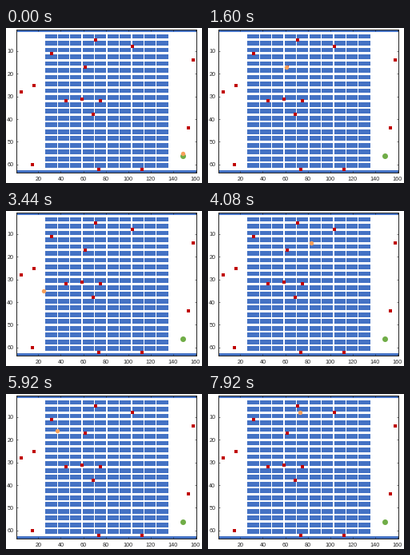
Recreate the animation shown at these times as a matplotlib script. Size 245x194 px, loop 8 s.

```python
import matplotlib.pyplot as plt
from matplotlib.animation import FuncAnimation
from matplotlib.patches import Rectangle

W, H, DPI = 245, 194, 72
COLS, ROWS = 160, 63
LEFT, RIGHT, TOP, BOTTOM = 12.98, 237.62, 2.03, 180.8
FRAMES, INTERVAL, CELLS_PER_FRAME = 100, 80, 10

plt.rcParams["font.family"] = "Liberation Sans"
BLUE, RED, GREEN, ORANGE = "#4472c4", "#c00000", "#70ad47", "#f8a05a"

STATION = (149, 56)
ORDERS = dict(A=(71, 5), B=(104, 8), C=(32, 11), D=(158, 14), E=(62, 17),
              F=(16, 25), G=(5, 28), H=(59, 31), I=(45, 32), J=(75, 32),
              K=(69, 38), L=(154, 44), M=(15, 60), N=(74, 62), O=(112, 62))
TOUR = "HICEJONMIDJCEJKHGFB"
SLOW_PICKS = "GHI"  # these cost one extra step

AISLES = [25, *range(37, 126, 11)]
SHELF_END, SIDE_LANE = 135, 156


def corners(start, goal):
    """Drive along the row aisle, cross at the leftmost aisle on the way."""
    (x, y), (gx, gy) = start, goal
    route = []
    if x > SHELF_END:  # open floor: line up with the goal's aisle first
        x = min(x, SIDE_LANE)
        route.append((x, y))
        y = gy + (2 - gy) % 3
    while y % 3 != 2:
        y += 1 if gy > y else -1
    cross = next((a for a in AISLES if min(x, gx) <= a <= max(x, gx)), gx)
    return route + [(x, y), (cross, y), (cross, gy), goal]


def straight(start, end):
    (x0, y0), (x1, y1) = start, end
    n = max(abs(x1 - x0), abs(y1 - y0))
    return [(x0 + (x1 - x0) * k // n, y0 + (y1 - y0) * k // n)
            for k in range(1, n + 1)]


def drive(start, tour):
    """One grid cell per step for the whole tour."""
    cells = [start]
    for name in tour:
        for corner in corners(cells[-1], ORDERS[name]):
            cells += straight(cells[-1], corner)
        if name in SLOW_PICKS:
            cells.append(cells[-1])
    return cells


cells = drive((STATION[0], STATION[1] - 1), TOUR)

fig = plt.figure(figsize=(W / DPI, H / DPI), dpi=DPI, facecolor="white")
ax = fig.add_axes([LEFT / W, 1 - BOTTOM / H, (RIGHT - LEFT) / W, (BOTTOM - TOP) / H])
ax.set_xlim(0.5, COLS + 0.5)
ax.set_ylim(ROWS + 0.5, 0.5)
ax.set_xticks(range(20, 161, 20))
ax.set_yticks(range(10, 61, 10))
ax.tick_params(direction="in", top=True, right=True, length=2, width=0.6,
               labelsize=7.3, color="#262626", labelcolor="#262626")
ax.tick_params(axis="x", pad=5.5)
ax.tick_params(axis="y", pad=3.5)
for spine in ax.spines.values():
    spine.set(color="#262626", linewidth=1)


def block(col, row, width, height):
    ax.add_patch(Rectangle((col - 0.5, row - 0.5), width, height,
                           facecolor=BLUE, linewidth=0))


for wall_row in (1, ROWS):
    block(1, wall_row, COLS, 1)
for row in range(3, 61, 3):
    for col in range(27, 127, 11):
        block(col, row, 10, 2)
for col in range(27, 127, 11):
    block(col, 60, 10, 2) if 60 not in range(3, 61, 3) else None

ax.plot(*zip(*ORDERS.values()), "s", color=RED, markersize=4.8, markeredgewidth=0, zorder=3)
ax.plot(*STATION, "o", color=GREEN, markersize=7, markeredgewidth=0, zorder=3)
robot, = ax.plot([], [], "o", color=ORANGE, markersize=5.4, markeredgewidth=0, zorder=4)


def update(frame):
    x, y = cells[frame * CELLS_PER_FRAME]
    robot.set_data([x], [y])
    return robot,


anim = FuncAnimation(fig, update, frames=FRAMES, interval=INTERVAL,
                     repeat=True, repeat_delay=0, blit=False)
plt.show()
```
